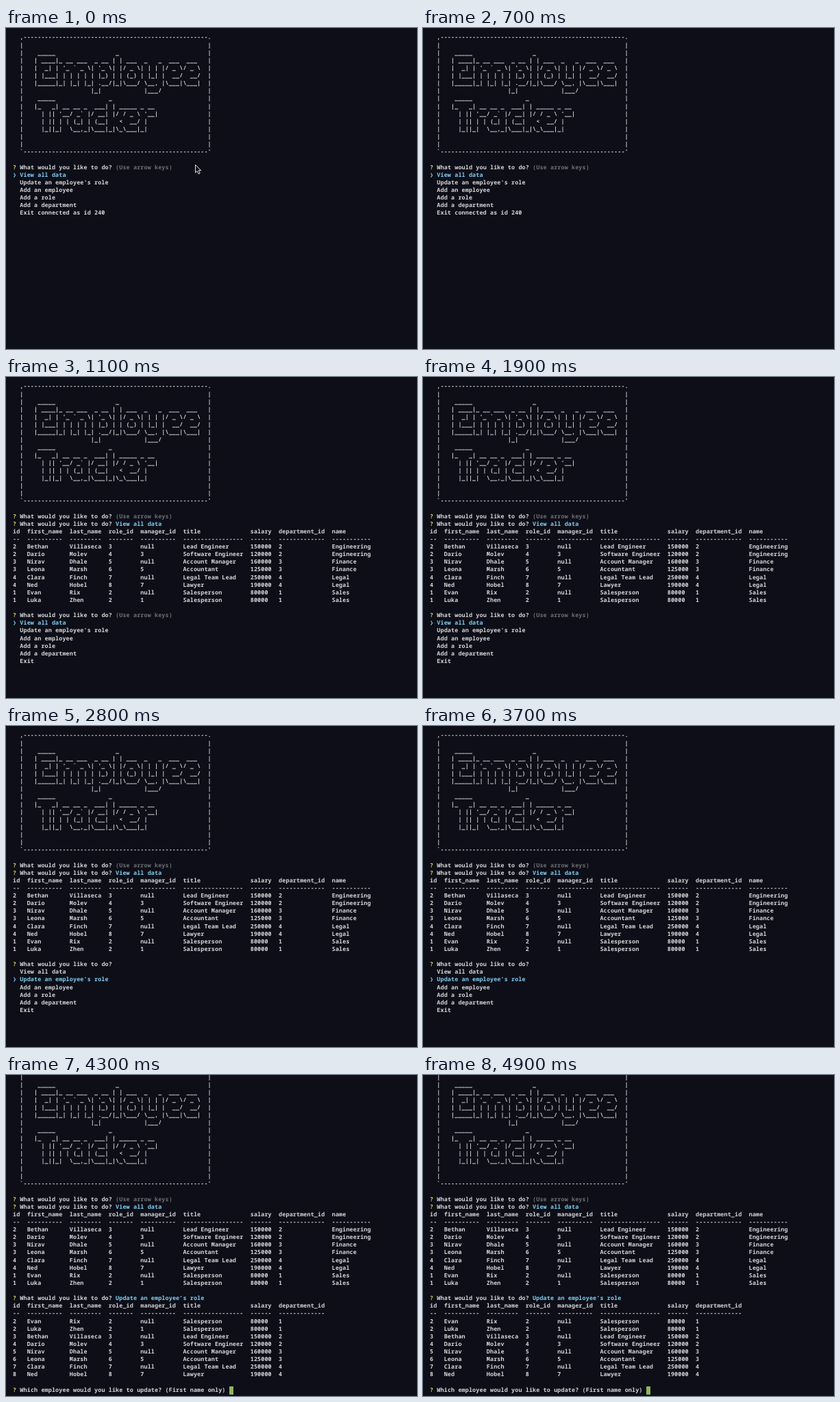
These frames come from a looping animation (600x468 px, 5000 ms). An HTML page:

```html
<!DOCTYPE html>
<html lang="en">
<head>
<meta charset="utf-8">
<title>Employee Tracker</title>
<style>
html, body { margin: 0; width: 100%; height: 100%; overflow: hidden; background: #0d0e17; }
#screen {
  position: absolute; left: 10px; top: 8.4px; margin: 0;
  font: 600 8.4px/11.12px "Noto Sans Mono", "DejaVu Sans Mono", monospace;
  letter-spacing: .15px; color: #d6d6d8;
  text-rendering: geometricPrecision; font-variant-ligatures: none;
}
u { color: #d9cf62; text-decoration: none; }
s { color: #6e6f74; text-decoration: none; }
em { color: #7fd0f5; font-style: normal; }
i { position: absolute; font-style: normal; }
#caret { position: absolute; left: 326px; top: 454px; width: 6px; height: 12px; background: #8fb35c; }
#mouse { position: absolute; left: 275px; top: 198px; }
</style>
</head>
<body>
<pre id="screen"></pre>
<div id="caret"></div>
<svg id="mouse" width="12" height="18" viewBox="0 0 12 18">
  <path d="M1.5 1.5v11.4l2.7-2.4 1.9 4.3 2-.9-1.9-4.2h3.5z" fill="#0b0b10" stroke="#e6e6e6"/>
</svg>
<script type="text/plain" id="logo">
 _____                 _
| ____|_ __ ___  _ __ | | ___  _   _  ___  ___
|  _| | '_ ` _ \| '_ \| |/ _ \| | | |/ _ \/ _ \
| |___| | | | | | |_) | | (_) | |_| |  __/  __/
|_____|_| |_| |_| .__/|_|\___/ \__, |\___|\___|
                |_|            |___/
 _____               _
|_   _| __ __ _  ___| | _____ _ __
  | || '__/ _` |/ __| |/ / _ \ '__|
  | || | | (_| | (__|   <  __/ |
  |_||_|  \__,_|\___|_|\_\___|_|

</script>
<script>
const LOOP = 5000, LINE = 11.12;
const $ = id => document.getElementById(id);

const rule = '-'.repeat(52);
const banner = [
  `  ,${rule}.`,
  ...$('logo').textContent.split('\n').map(l => `  |   ${l.padEnd(49)}|`),
  `  \`${rule}'`, ''
].join('\n').replace(/</g, '&lt;') + '\n';

// first name, last name, role, manager, title, salary, department
const staff = [
  ['Evan', 'Rix', 2, null, 'Salesperson', 80000, 1],
  ['Luka', 'Zhen', 2, 1, 'Salesperson', 80000, 1],
  ['Bethan', 'Villaseca', 3, null, 'Lead Engineer', 150000, 2],
  ['Dario', 'Molev', 4, 3, 'Software Engineer', 120000, 2],
  ['Nirav', 'Dhale', 5, null, 'Account Manager', 160000, 3],
  ['Leona', 'Marsh', 6, 5, 'Accountant', 125000, 3],
  ['Clara', 'Finch', 7, null, 'Legal Team Lead', 250000, 4],
  ['Ned', 'Hobel', 8, 7, 'Lawyer', 190000, 4]
];
const departments = ['', 'Sales', 'Engineering', 'Finance', 'Legal'];
const heads = ['id', 'first_name', 'last_name', 'role_id', 'manager_id', 'title', 'salary', 'department_id'];

function table(heads, rows) {
  const widths = heads.map((h, c) => Math.max(h.length, ...rows.map(r => String(r[c]).length)));
  const dashes = widths.map(w => '-'.repeat(w));
  return [heads, dashes, ...rows]
    .map(r => r.map((v, c) => String(v).padEnd(widths[c])).join('  ')).join('\n') + '\n\n';
}

const ask = (tail = '', text = 'What would you like to do?') => `<u>?</u> ${text} ${tail}\n`;
const hint = '<s>(Use arrow keys)</s>';
const options = ['View all data', "Update an employee's role", 'Add an employee', 'Add a role', 'Add a department', 'Exit'];
const menu = picked => options
  .map((o, n) => n === picked ? `<em><i>❯</i>  ${o}</em>` : `  ${o}`).join('\n');
const chosen = n => ask(`<em>${options[n]}</em>`);

const byDepartment = [...staff.slice(2), ...staff.slice(0, 2)].map(r => [r[6], ...r, departments[r[6]]]);
const byRole = staff.map(r => [r[2], ...r]);

const start = banner + ask(hint);
const intro = start + menu(0) + ' connected as id 240';
const viewed = start + chosen(0);
const listed = viewed + table([...heads, 'name'], byDepartment);
const update = listed + chosen(1) + table(heads, byRole)
  + ask('', 'Which employee would you like to update? (First name only)');

const scenes = [
  [0, intro],
  [1000, viewed],
  [1100, listed + ask(hint) + menu(0)],
  [2700, listed + ask() + menu(1)],
  [3800, update]
];

let shown;
function draw(now) {
  const t = now % LOOP;
  const html = scenes.filter(([at]) => at <= t).pop()[1];
  if (html !== shown) $('screen').innerHTML = shown = html;
  const last = html === update;
  $('screen').style.transform = last ? `translateY(${-2 * LINE}px)` : 'none';
  $('caret').style.display = last ? '' : 'none';
  $('mouse').style.display = t < 200 ? '' : 'none';
}

const began = performance.now();
function tick() {
  draw(performance.now() - began);
  requestAnimationFrame(tick);
}
tick();
</script>
</body>
</html>
```
